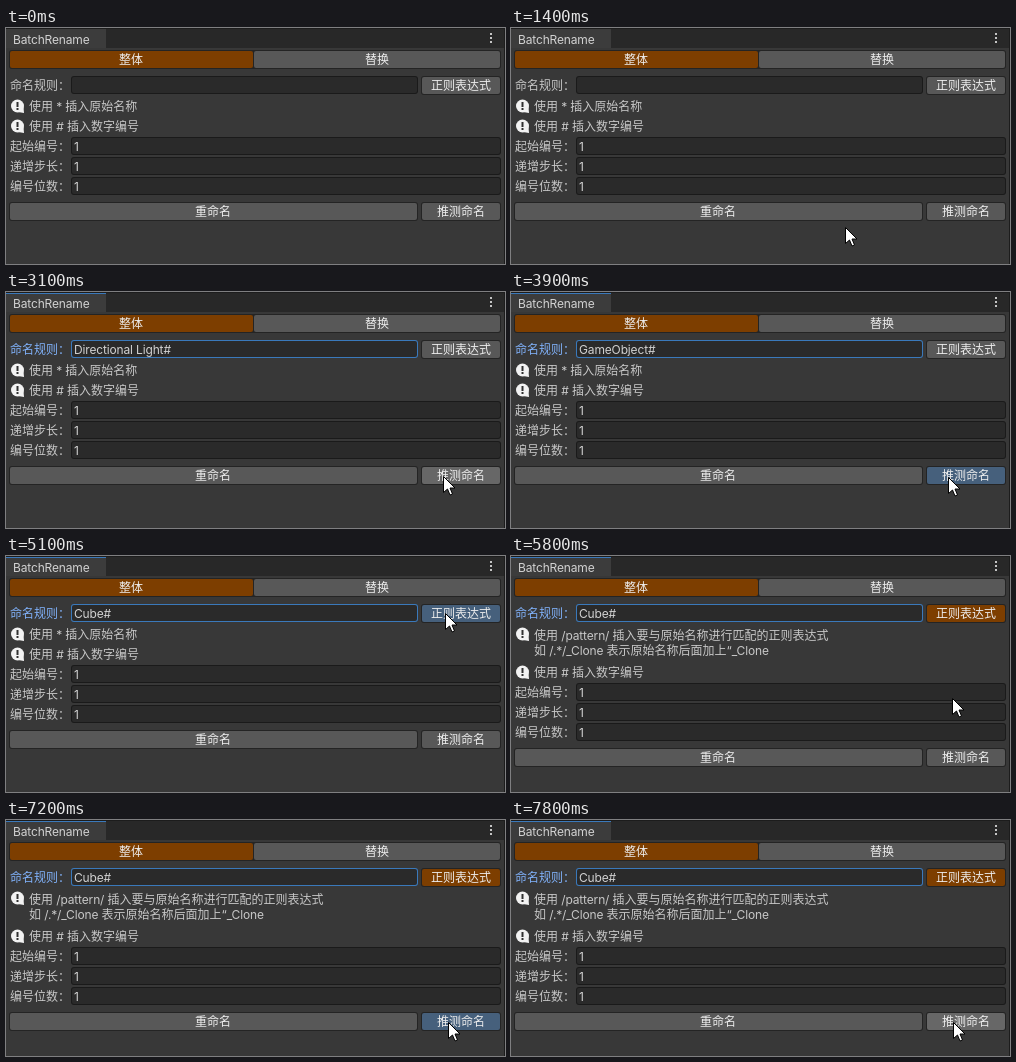
These frames come from a looping animation (499x236 px, 8000 ms). An HTML page with a canvas:

```html
<!DOCTYPE html>
<html lang="zh-CN">
<head>
<meta charset="utf-8">
<title>BatchRename</title>
<style>
html, body { margin: 0; width: 100%; height: 100%; overflow: hidden; background: #383838; }
canvas { display: block; }
</style>
</head>
<body>
<canvas id="stage" width="499" height="236"></canvas>
<script>
const ctx = document.getElementById('stage').getContext('2d');
const LOOP = 8000, STEP = 100;
const FOCUS_AT = 2100, REGEX_AT = 5200;
const FONT = '12px Inter, "Noto Sans CJK SC", "Noto Sans CJK", sans-serif';
const LATIN = /^[ -~“]/, RUNS = /[ -~“]+|[^ -~“]+/g;
const C = {
  window: '#383838', bar: '#282828', tab: '#3c3c3c', edge: '#1c1c1c',
  text: '#c8c8c8', bright: '#eeeeee', accent: '#80b2fb', ring: '#3a79bb',
  button: '#585858', hover: '#676767', pressed: '#46607c',
  on: '#7d3e00', onHover: '#914800'
};

// Pointer path: time, x, y of the tip
const PATH = [
  [200, 491, 57], [700, 447, 60], [900, 446, 64], [1400, 334, 200],
  [1600, 346, 209], [2000, 437, 185], [3300, 437, 185], [3400, 437, 186],
  [4500, 437, 186], [5000, 439, 58], [5300, 439, 58], [6200, 442, 203]
];

// Guess clicks: release time and the name it yields; each press is one step earlier
const D = 'Directional Light#', G = 'GameObject#', B = 'Cube#';
const CLICKS = [
  [2200, B], [2400, G], [2600, D], [2800, G], [3100, D],
  [3400, B], [3600, D], [3800, G], [4000, B], [4200, D], [4400, B],
  [6500, G], [6700, B], [6900, D], [7100, B], [7300, G], [7500, D], [7800, B]
];

function pointerAt(t) {
  if (t < PATH[0][0]) return null;
  const i = PATH.findIndex(p => p[0] > t);
  if (i < 0) return PATH[PATH.length - 1].slice(1);
  const [t0, x0, y0] = PATH[i - 1], [t1, x1, y1] = PATH[i];
  const u = (t - t0) / (t1 - t0), k = u * u * (3 - 2 * u);
  return [Math.round(x0 + (x1 - x0) * k), Math.round(y0 + (y1 - y0) * k)];
}

function rect(x, y, w, h, color) {
  ctx.fillStyle = color;
  ctx.fillRect(x, y, w, h);
}

function round(x, y, w, h, r, color) {
  ctx.fillStyle = color;
  ctx.beginPath();
  ctx.roundRect(x, y, w, h, r);
  ctx.fill();
}

// Latin runs are tracked slightly tighter than Chinese ones
function text(str, x, y, color = C.text) {
  ctx.fillStyle = color;
  for (const run of str.match(RUNS) || []) {
    ctx.letterSpacing = LATIN.test(run) ? '-0.15px' : '0px';
    ctx.fillText(run, x, y);
    x += ctx.measureText(run).width;
  }
}

function button(label, x, y, w, color, radius = 3) {
  round(x, y, w, 19, radius, '#242424');
  round(x + 1, y + 1, w - 2, 17, radius && 2, color);
  text(label, Math.floor(x + w / 2 - label.length * 6), y + 14, C.bright);
}

function field(label, value, y, w, focused) {
  text(label + '：', 4, y + 14, focused ? C.accent : C.text);
  round(65, y, w, 18, 3, focused ? C.ring : '#1a1a1a');
  round(66, y + 1, w - 2, 16, 2, '#2a2a2a');
  text(value, 68, y + 14, '#d2d2d2');
}

function hint(lines, iconY, baseline) {
  ctx.fillStyle = '#f2f2f2';
  ctx.beginPath();
  ctx.arc(11.5, iconY, 6.5, 0, Math.PI * 2);
  ctx.fill();
  ctx.beginPath();
  ctx.moveTo(12, iconY + 6);
  ctx.lineTo(18, iconY + 7);
  ctx.lineTo(17.5, iconY + 1);
  ctx.fill();
  rect(10.5, iconY - 4, 2, 5, '#303030');
  rect(10.5, iconY + 2, 2, 2, '#303030');
  lines.forEach((line, i) => text(line, 23, baseline + i * 15));
}

function pointer([x, y]) {
  ctx.save();
  ctx.translate(x + 0.5, y - 0.5);
  ctx.beginPath();
  [[0, 0], [0, 16], [4, 12.5], [6.5, 18.5], [9, 17.5], [6.5, 11.5], [11.5, 11.5]]
    .forEach(p => ctx.lineTo(...p));
  ctx.closePath();
  ctx.fillStyle = '#fff';
  ctx.fill();
  ctx.strokeStyle = '#000';
  ctx.lineWidth = 1;
  ctx.stroke();
  ctx.restore();
}

function draw(t) {
  const tip = pointerAt(t);
  const name = CLICKS.reduce((last, [at, str]) => at <= t ? str : last, '');
  const regex = t >= REGEX_AT;
  const shift = regex ? 18 : 0;
  const guessDown = CLICKS.some(([at]) => t >= at - STEP && t < at);
  const regexDown = t >= REGEX_AT - STEP && !regex;
  // Hover is only shown once the window has focus
  const over = y => t >= FOCUS_AT && tip[0] >= 415 && tip[0] < 495 && tip[1] >= y && tip[1] < y + 19;

  rect(0, 0, 499, 236, C.window);
  rect(0, 0, 499, 20, C.bar);
  rect(0, 0, 499, 1, C.edge);
  rect(0, 1, 100, 19, C.tab);
  if (t >= FOCUS_AT) rect(0, 1, 100, 1, C.ring);
  rect(498, 0, 1, 236, C.edge);
  text('BatchRename', 7, 16, '#d2d2d2');
  for (const y of [5, 9, 13]) rect(484, y, 2, 2, '#c4c4c4');

  button('整体', 3, 22, 245, C.on, [3, 0, 0, 3]);
  button('替换', 247, 22, 248, C.button, [0, 3, 3, 0]);

  field('命名规则', name, 48, 347, name !== '');
  const regexHover = over(48);
  const regexColor = regexDown ? C.pressed
    : regex ? (regexHover ? C.onHover : C.on)
    : regexHover ? C.hover : C.button;
  button('正则表达式', 415, 48, 80, regexColor);

  if (regex) {
    hint(['使用 /pattern/ 插入要与原始名称进行匹配的正则表达式',
          '如 /.*/_Clone 表示原始名称后面加上“_Clone'], 78, 84);
  } else {
    hint(['使用 * 插入原始名称'], 78, 83);
  }
  hint(['使用 # 插入数字编号'], 98 + shift, 103 + shift);

  ['起始编号', '递增步长', '编号位数'].forEach((label, i) =>
    field(label, '1', 109 + shift + i * 20, 430, false));

  const foot = 174 + shift;
  button('重命名', 3, foot, 409, C.button);
  button('推测命名', 415, foot, 80, guessDown ? C.pressed : over(foot) ? C.hover : C.button);

  if (tip) pointer(tip);
}

ctx.font = FONT;
ctx.textBaseline = 'alphabetic';
const start = performance.now();

function tick() {
  const t = (performance.now() - start) % LOOP;
  draw(Math.floor(t / STEP) * STEP);
  requestAnimationFrame(tick);
}
tick();
</script>
</body>
</html>
```
